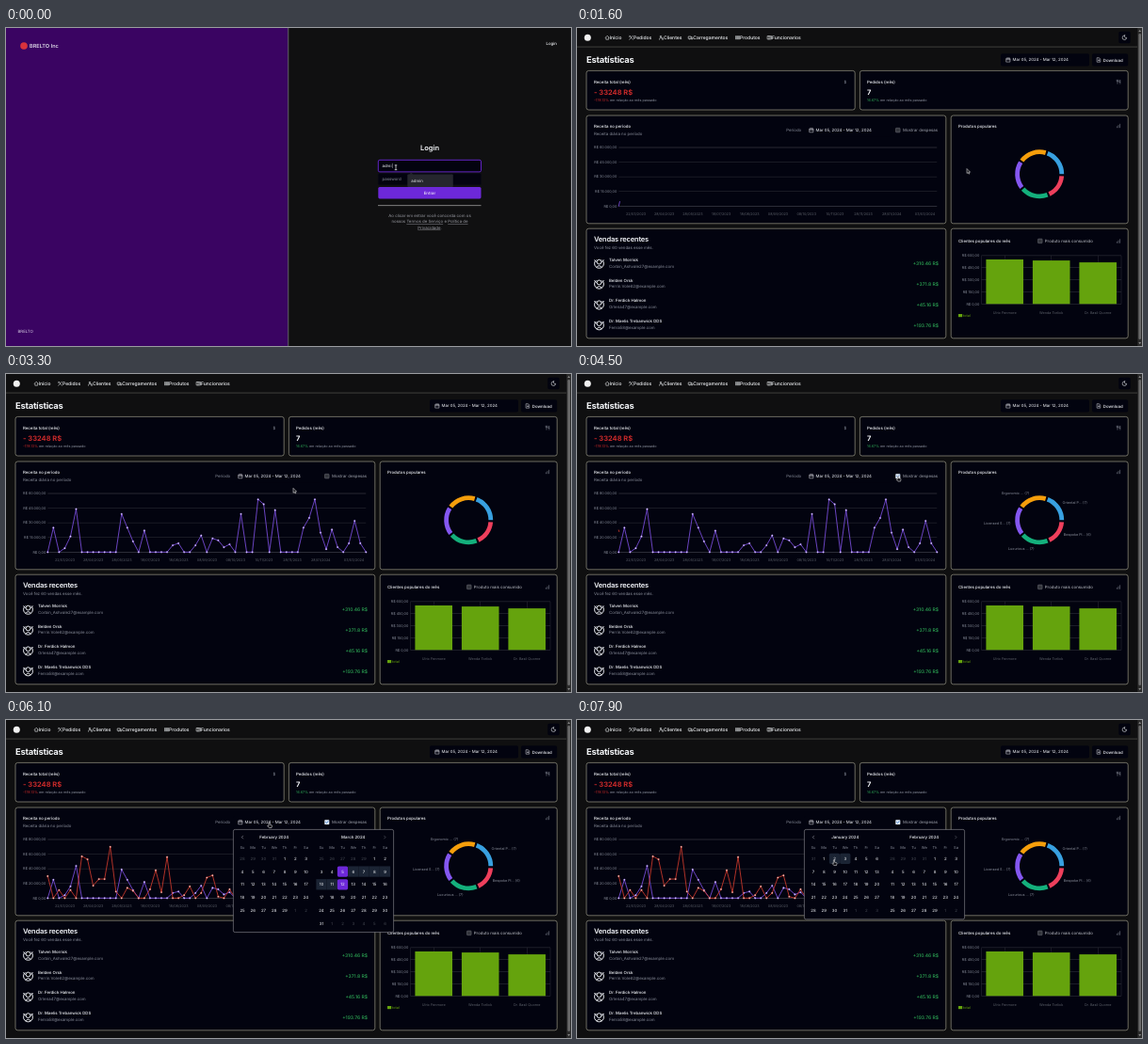
Animation, 600 px wide and 338 px high, one loop 8000 ms. Source, as an HTML page:

```html
<!DOCTYPE html>
<html lang="pt-BR">
<head>
<meta charset="utf-8">
<title>Painel</title>
<style>
  html, body { margin: 0; width: 100%; height: 100%; overflow: hidden; background: #0f0f10; }
  svg { display: block; width: 100vw; height: 100vh; font-family: Inter, "Open Sans", sans-serif; text-rendering: geometricPrecision; }
  text { white-space: pre; }
</style>
</head>
<body>
<svg id="stage" viewBox="0 0 600 338" preserveAspectRatio="none"></svg>
<script>
const LOOP = 8000;
const INK = '#f5f7fa', MUTED = '#8a8f9b', FAINT = '#5c6069', CARD = '#02030f', HOVER = '#1b2434',
      EDGE = '#a5a28e', VIOLET = '#7c50e0', RED = '#cf3a2c', GREEN = '#2faf58', LIME = '#65a30d';

// Event times in ms
const T = { typed: 100, picked: 500, password: 650, submit: 1150, dash: 1600, dots: 3200, pieLabels: 3600,
            expenses: 4500, popover: 6000, prevMonth: 7000 };

const text = (x, y, s, { size = 4.375, fill = INK, weight = 400, anchor = 'start', extra = '' } = {}) =>
  `<text x="${x}" y="${y}" font-size="${size}" fill="${fill}" font-weight="${weight}" text-anchor="${anchor}" ${extra}>${s}</text>`;
const rect = (x, y, w, h, fill, r = 0, extra = '') =>
  `<rect x="${x}" y="${y}" width="${w}" height="${h}" rx="${r}" fill="${fill}" ${extra}/>`;
const path = (d, stroke = INK, w = 0.6, extra = '') =>
  `<path d="${d}" fill="none" stroke="${stroke}" stroke-width="${w}" stroke-linecap="round" stroke-linejoin="round" ${extra}/>`;
const circle = (x, y, r, fill, extra = '') => `<circle cx="${x}" cy="${y}" r="${r}" fill="${fill}" ${extra}/>`;
const group = (id, body, extra = '') => `<g id="${id}" ${extra}>${body}</g>`;
const $ = id => document.getElementById(id);
const show = (id, on) => { $(id).style.display = on ? '' : 'none'; };
const clamp = v => Math.max(0, Math.min(1, v));
const easeOut = v => 1 - (1 - clamp(v)) ** 2.2;
const smooth = v => (v = clamp(v), v * v * (3 - 2 * v));

// ---------- login ----------
function login() {
  const link = s => `<tspan text-decoration="underline">${s}</tspan>`;
  const note = { fill: '#9a9ba3', anchor: 'middle' };
  return rect(0, 0, 600, 338, '#101011') + rect(0, 0, 299.5, 338, '#3a0462') + rect(299.4, 0, 0.8, 338, '#77757c')
    + circle(19, 19, 3.8, '#d8323c')
    + text(25, 20.8, 'BRELTO Inc', { size: 5.625, weight: 500 })
    + text(12.5, 323.8, 'BRELTO', { fill: '#d9cfe4' })
    + text(585, 17.8, 'Login', { weight: 500, anchor: 'end' })
    + text(450, 130.3, 'Login', { size: 7.5, weight: 600, anchor: 'middle' })
    + rect(395.3, 140.3, 109.2, 12.6, '#03030f', 1.6, 'id="userBox"')
    + text(399.5, 148.3, '', { extra: 'id="user"' })
    + rect(395.3, 154.5, 109.2, 12.3, '#03030f', 1.6, 'id="passBox"')
    + text(399.5, 162.3, 'password', { extra: 'id="pass"' })
    + rect(395.3, 169, 109.2, 12.4, '#6d28d9', 1.6, 'id="submit"')
    + text(450, 176.8, 'Entrar', { weight: 500, anchor: 'middle', extra: 'id="submitText"' })
    + rect(395, 188.3, 109.5, 0.8, '#9b9b9b')
    + text(450, 201, 'Ao clicar em entrar você concorda com os', note)
    + text(450, 207.4, `nossos ${link('Termos de Serviço')} e ${link('Política de')}`, note)
    + text(450, 213.6, `${link('Privacidade')}.`, note)
    + group('suggest', rect(426.3, 155.6, 48.5, 13.4, '#25262e', 1) + text(430.3, 163.7, 'admin', { fill: '#e4e6ea' })
      + '<path d="M428 155.7l2.3-2 2.3 2z" fill="#25262e"/>');
}

// ---------- dashboard pieces ----------
const card = (x, y, w, h) => rect(x, y, w, h, CARD, 2.4, `stroke="${EDGE}" stroke-width=".65"`);
const calendarIcon = (x, y) => path(`M${x - 1.9} ${y - 1.6}h3.8v3.8h-3.8zM${x - 1.9} ${y - .2}h3.8M${x - .9} ${y - 2.3}v1.2M${x + .9} ${y - 2.3}v1.2`, INK, .45);
const barsIcon = (x, y) => path(`M${x - 1.6} ${y + 1.8}v-1M${x} ${y + 1.8}v-2.3M${x + 1.6} ${y + 1.8}v-3.6`, MUTED, .55);
const dateButton = (x, y, id) => rect(x, y, 94, 13.2, CARD, 1.8, `id="${id}"`) + calendarIcon(x + 8, y + 6.6)
  + text(x + 12.6, y + 8.1, 'Mar 05, 2024 - Mar 12, 2024');
const box = (x, y) => rect(x - 2.3, y - 2.3, 4.6, 4.6, '#34363d', .6, 'stroke="#70737b" stroke-width=".5"');

function header() {
  const nav = [['Início', 34.7, 'M-2 0L0-2 2 0M-1.4 0v2h2.8V0'],
    ['Pedidos', 60, 'M-1.7-2L1.7 2M1.7-2L-1.7 2M-2-.8l1-1'],
    ['Clientes', 92, 'M-2 2q0-2 1.5-2t1.5 2M1 0q1 0 1 2M-1.2-1.2a.7.7 0 1 0 1.4 0a.7.7 0 1 0-1.4 0'],
    ['Carregamentos', 123.3, 'M-2.2-1.2h2.6v2.4h-2.6zM.4-.4h1.2l.7.8v.8H.4M-1.3 1.7h.2M1.2 1.7h.2'],
    ['Produtos', 173, 'M-2-1.6v3.2M-.9-1.6v3.2M0-1.6v3.2M1-1.6v3.2M2-1.6v3.2'],
    ['Funcionarios', 207, 'M-2-1.7h4v3.4h-4zM-.6-1.7v3.4M.4-.5h1M.4.6h1']];
  return rect(0, 0, 600, 338, '#0f0f10') + rect(0, 19.7, 595, .7, '#55554f')
    + circle(11.3, 10.2, 3.5, '#f2f2f2')
    + nav.map(([s, x, d]) => path(d, INK, .55, `transform="translate(${x - 2.5} 10.2)"`) + text(x, 12, s, { size: 5, weight: 500 })).join('')
    + rect(575.3, 3.8, 12.4, 12.4, CARD, 1.8) + path('M581.6 7.9a1.7 1.7 0 0 0 2.1 2.4a2.3 2.3 0 1 1-2.1-2.4z', INK, .55)
    + rect(595.3, 0, 4.7, 338, '#2b2b2b') + rect(596.4, 6, 2.6, 325, '#6b6b6b', 1.3)
    + '<path d="M596.3 4l1.4-1.9 1.4 1.9zM596.3 334l1.4 1.9 1.4-1.9z" fill="#8c8c8c"/>'
    + text(10, 37, 'Estatísticas', { size: 9.375, weight: 700, extra: 'letter-spacing="-.23"' })
    + dateButton(450, 27.3, 'topDate') + rect(547, 27.3, 38.2, 13.2, CARD, 1.8)
    + path('M552.5 31.7h2l1.2 1.2v3.3h-3.2zM554.1 33v1.8M553.3 34.2l.8.8.8-.8', INK, .45)
    + text(558.8, 35.5, 'Download', { weight: 500 });
}

function summary() {
  const line = (x, part, color) => text(x, 78.4, `<tspan fill="${color}">${part}</tspan> em relação ao mês passado`, { size: 3.75, fill: MUTED });
  return card(10, 45.4, 285.2, 41.6) + card(300.4, 45.4, 284.8, 41.6)
    + text(18, 58.7, 'Receita total (mês)', { weight: 500 }) + text(285, 58.7, '$', { fill: MUTED, anchor: 'middle' })
    + text(18, 71.2, '- 33248 R$', { size: 7.5, weight: 700, fill: '#cb2a2a' }) + line(18, '-178.13%', '#cb2a2a')
    + text(308, 58.7, 'Pedidos (mês)', { weight: 500 }) + text(308, 71.2, '7', { size: 7.5, weight: 700 })
    + line(308, '16.67%', GREEN)
    + path('M573.2 55.2v1.5h1.6v-1.5M574 55.2v4M576.8 59.2v-4q-1 1-1 2.3h1', MUTED, .5);
}

// Heights of the two series on a 60-unit and an 80-unit axis
const income = { 1: 25, 3: 4, 4: 16, 5: 44, 13: 39, 14: 25, 15: 11, 17: 22, 22: 7, 23: 9, 26: 7, 27: 17, 29: 14, 30: 12, 31: 5, 32: 8,
  34: 39, 37: 54, 38: 49, 40: 43, 45: 25, 46: 35, 47: 54, 48: 20, 49: 3, 50: 23, 51: 5, 53: 9, 54: 32, 55: 9 };
const costs = { 0: 30, 2: 11, 4: 11, 6: 57, 7: 53, 8: 17, 9: 26, 10: 26, 11: 70, 12: 9, 14: 14, 15: 10, 18: 12, 19: 38, 20: 8, 21: 56,
  24: 4, 25: 16, 27: 7, 28: 28, 29: 31, 30: 2, 32: 12, 35: 14, 36: 5, 38: 18, 39: 6, 42: 32, 43: 8, 45: 4, 49: 6, 51: 9, 54: 4, 55: 13 };
const COUNT = 57, BASE = 189.3, SPAN = 62.3;
const points = (series, top) => Array.from({ length: COUNT }, (_, i) => [44.3 + i * 6.036, BASE - (series[i] || 0) * SPAN / top]);
const toPath = pts => 'M' + pts.map(p => p.map(v => v.toFixed(2)).join(' ')).join('L');

const series = (id, color) => group(id, path('', color, .85, `id="${id}Line" pathLength="1"`)
  + group(id + 'Dots', Array.from({ length: COUNT }, () => circle(0, 0, .85, '#fff', `stroke="${color}" stroke-width=".45"`)).join('')));

function revenue() {
  const dates = ['22/03/2023', '28/04/2023', '28/05/2023', '18/07/2023', '18/08/2023', '08/09/2023', '08/10/2023', '10/11/2023', '28/11/2023', '28/01/2024', '03/03/2024'];
  let s = card(10, 93, 381.8, 114.8) + text(18, 105.8, 'Receita no período', { weight: 500 })
    + text(18, 113.8, 'Receita diária no período', { fill: MUTED })
    + text(222.3, 110.1, 'Período', { fill: MUTED }) + dateButton(241, 102, 'chartDate')
    + box(340.8, 108.6) + group('check', rect(338.4, 106.2, 4.8, 4.8, '#dce8f5', .6) + path('M339.6 108.6l.9 1 1.6-2', '#1c62c4', .7))
    + text(346, 110.1, 'Mostrar despesas', { fill: '#a0a4ad' });
  for (let i = 0; i < 5; i++) {
    const y = BASE - SPAN * i / 4;
    s += rect(44.3, y - .25, 338, .5, i === 4 ? '#4c4d55' : i ? '#303139' : '#55565e')
      + text(42.3, y + 1.2, '', { size: 3.75, fill: MUTED, anchor: 'end', extra: `id="axis${i}"` });
  }
  dates.forEach((d, i) => { s += text(62.5 + i * 30.2 + (i > 9 ? 5 : 0), 199.3, d, { size: 3.75, fill: FAINT, anchor: 'middle' }); });
  return s + series('income', VIOLET) + series('costs', RED);
}

function products() {
  const parts = [['#38a0e0', 7], ['#f59e0b', 7], ['#8457f0', 7], ['#14b07c', 7], ['#ee3f5c', 6]];
  const at = (r, deg) => { const a = deg * Math.PI / 180; return `${491.2 + r * Math.cos(a)} ${155.3 - r * Math.sin(a)}`; };
  let from = 0, ring = '';
  for (const [color, n] of parts) {
    const to = from + 335 * n / 34;
    ring += `<path d="M${at(26, from)}A26 26 0 0 0 ${at(26, to)}L${at(21.2, to)}A21.2 21.2 0 0 1 ${at(21.2, from)}z" fill="${color}"/>`;
    from = to + 5;
  }
  const labels = [['Ergonomic ... (7)', 451, 128.3], ['Oriental P... (7)', 515.6, 137.7], ['Licensed S... (7)', 432, 159.7],
    ['Luxurious ... (7)', 458, 186.7], ['Bespoke Pl... (6)', 516.8, 172.3]];
  return card(397.2, 93, 188, 114.8) + text(405, 105.8, 'Produtos populares', { weight: 500 }) + barsIcon(575, 104) + ring
    + group('pieLabels', labels.map(([s, x, y]) => text(x, y, s, { size: 3.75, fill: MUTED })).join(''));
}

function sales() {
  const rows = [['Talven Morrisk', 'Corbin_Ashvale27@example.com', '310.46'], ['Belden Orsk', 'Perrin.Vole62@example.com', '371.8'],
    ['Dr. Ferdick Halmon', 'Orlena47@example.com', '45.16'], ['Dr. Maelis Trebanwick DDS', 'Fenra58@example.com', '193.76']];
  return card(10, 213.2, 381.8, 116.6)
    + text(18, 227.4, 'Vendas recentes', { size: 7.5, weight: 600, extra: 'letter-spacing="-.19"' })
    + text(18, 235.4, 'Você fez 60 vendas esse mês.', { fill: MUTED })
    + rows.map(([name, mail, sum], i) => {
      const y = 250.3 + i * 21.85;
      return path(`M20 ${y - 3.6}a5 5 0 1 0 7 0M21 ${y + 3.9}q2.5-3.4 5 0M18.6 ${y - 3.4}l2 1.6M28.4 ${y - 3.4}l-2 1.6`, INK, .95)
        + circle(23.5, y - 1.7, 2.4, 'none', `stroke="${INK}" stroke-width=".95"`)
        + text(34, y - 2.6, name, { weight: 500 }) + text(34, y + 4.2, mail, { fill: MUTED })
        + text(384, y + 1.7, `+${sum} R$`, { size: 5, weight: 500, fill: GREEN, anchor: 'end' });
    }).join('');
}

function customers() {
  const bars = [['Ulric Fenmore', 47.3], ['Wenda Torlick', 46.2], ['Dr. Basil Quorne', 44.2]];
  let s = card(397.2, 213.2, 188, 116.6) + text(405, 228, 'Clientes populares do mês', { weight: 500 })
    + box(491.8, 226.4) + text(496.8, 228, 'Produto mais consumido', { fill: '#c5c8ce' }) + barsIcon(575, 226.5);
  for (let i = 0; i < 5; i++) {
    const y = 293.3 - i * 12.85;
    s += rect(429.5, y - .2, 148.5, .4, '#454650') + text(427.3, y + 1.3, `R$ ${i * 150},00`, { size: 3.75, fill: MUTED, anchor: 'end' });
  }
  for (const x of [429.5, 454.2, 503.7, 553.2, 578]) s += rect(x - .2, 241.9, .4, 51.4, '#3a3b44');
  bars.forEach(([name, h], i) => {
    const x = 434.4 + i * 49.5;
    s += rect(x, 293.3 - h, 39.6, h, LIME) + text(x + 19.8, 303.6, name, { size: 3.75, fill: FAINT, anchor: 'middle' });
  });
  return s + rect(405, 304, 4.2, 3.2, LIME) + text(410, 307.2, 'total', { size: 3.75, fill: LIME });
}

// ---------- calendar ----------
const STEP = 11.25, ROW = 13.75;

function month(index, left) {
  const first = new Date(2024, index, 1), lead = first.getDay();
  const days = new Date(2024, index + 1, 0).getDate(), total = Math.ceil((lead + days) / 7) * 7;
  let s = text(left + STEP * 3, 126.2, first.toLocaleString('en-US', { month: 'long' }) + ' 2024', { weight: 500, anchor: 'middle' });
  ['Su', 'Mo', 'Tu', 'We', 'Th', 'Fr', 'Sa'].forEach((d, i) => { s += text(left + i * STEP, 137.3, d, { size: 4, fill: MUTED, anchor: 'middle' }); });
  for (let i = 0; i < total; i++) {
    const day = new Date(2024, index, 1 - lead + i), inside = day.getMonth() === index, n = day.getDate();
    const x = left + (i % 7) * STEP, y = 147.3 + Math.floor(i / 7) * ROW;
    const end = n === 5 || n === 12;
    if (index === 2 && inside && n >= 5 && n <= 12)
      s += rect(x - 5.63, y - 5.63, STEP, STEP, end ? '#6d28d9' : HOVER, end ? 1.6 : 0);
    s += text(x, y + 1.6, n, { fill: inside ? INK : '#454952', anchor: 'middle' });
  }
  return s;
}

function popover() {
  const frame = h => rect(241.4, 116.4, 170.2, h, CARD, 1.8, 'stroke="#85868b" stroke-width=".65"');
  const hoverCell = (id, col) => rect(251 + col * STEP - 5.63, 141.7, STEP, STEP, HOVER, 1.6, `id="${id}"`);
  return group('late', frame(109.2) + month(1, 251) + month(2, 335))
    + group('early', frame(95.4) + hoverCell('day2', 2) + hoverCell('day3', 3) + month(0, 251) + month(1, 335))
    + rect(246.6, 120.2, 8.8, 8.8, HOVER, 1.5, 'id="prevHover"')
    + path('M251.6 123.2l-1.3 1.4 1.3 1.4', '#b5b8c0', .55) + path('M401.7 123.2l1.3 1.4-1.3 1.4', '#6e727b', .55);
}

const cursors = group('arrow', '<path d="M0 0v5l1.2-1 .8 1.7.8-.4-.8-1.6h1.6z" fill="#15151a" stroke="#f4f4f4" stroke-width=".5"/>')
  + group('hand', '<path d="M-.6 0q.6-.7 1.1 0v2.2l2 .4q.7.3.5 1.1l-.5 1.9h-2.7l-1.7-2q.3-.8 1.3 0z" fill="#15151a" stroke="#f4f4f4" stroke-width=".5"/>')
  + group('beam', path('M-.9-2.4h1.8M0-2.4v4.8M-.9 2.4h1.8', '#fff', .65))
  + group('denied', circle(0, 0, 2.3, '#3a1418', 'stroke="#e8a9a9" stroke-width="1.5"')
    + circle(0, 0, 2.3, 'none', 'stroke="#d8343c" stroke-width="1"') + path('M-1.6-1.6l3.2 3.2', '#d8343c', .9));

$('stage').innerHTML = group('login', login())
  + group('dash', header() + summary() + revenue() + products() + sales() + customers() + group('popover', popover()))
  + group('cursor', cursors);

// ---------- motion ----------
const route = [[0, 414, 148.3], [1599, 414, 148.3], [1600, 414, 149.5], [2500, 414, 149.5], [3200, 305, 121.3], [3500, 305, 121.3],
  [4200, 341, 108.5], [4650, 341, 108.5], [5300, 279.5, 109], [6150, 279.5, 109], [6600, 252, 126.5], [7150, 252, 126.5],
  [7700, 286, 148], [7880, 273, 149], [8000, 273, 149]];

function pointer(t) {
  const i = route.findIndex(p => p[0] > t), [t0, x0, y0] = route[i - 1], [t1, x1, y1] = route[i];
  const k = smooth((t - t0) / (t1 - t0));
  return [x0 + (x1 - x0) * k, y0 + (y1 - y0) * k];
}

function drawSeries(id, data, top, progress, dots) {
  const pts = points(data, top);
  $(id + 'Line').setAttribute('d', toPath(pts));
  $(id + 'Line').setAttribute('stroke-dasharray', progress >= 1 ? 'none' : `${progress} 2`);
  show(id + 'Dots', dots);
  if (dots) [...$(id + 'Dots').children].forEach((c, i) => { c.setAttribute('cx', pts[i][0]); c.setAttribute('cy', pts[i][1]); });
}

function renderLogin(t) {
  const busy = t >= T.submit, onPass = t >= T.picked && !busy, onUser = t < T.picked;
  const letters = Math.max(0, Math.min(5, Math.floor((t - T.password) / 80) + 1));
  const ring = on => on ? '#6d28d9' : '#0b0c17';
  $('user').textContent = (t < T.typed ? 'admi' : 'admin') + (onUser ? '|' : '');
  $('user').setAttribute('fill', busy ? '#777b84' : INK);
  $('pass').textContent = letters ? '•'.repeat(letters) : 'password';
  $('pass').setAttribute('fill', letters ? (busy ? '#b4b6bc' : INK) : MUTED);
  for (const [id, on] of [['userBox', onUser], ['passBox', onPass]]) {
    $(id).setAttribute('stroke', ring(on));
    $(id).setAttribute('stroke-width', on ? .9 : .5);
  }
  $('submit').setAttribute('fill', busy ? '#431a80' : '#6d28d9');
  $('submitText').setAttribute('fill', busy ? '#a08fb8' : '#efe8fb');
  show('suggest', onUser);
}

function renderDash(t, x, y) {
  const costsOn = t >= T.expenses, open = t >= T.popover, early = t >= T.prevMonth;
  const top = 60 + 20 * easeOut((t - T.expenses) / 700);
  for (let i = 0; i < 5; i++) $('axis' + i).textContent = `R$ ${i ? i * (costsOn ? 20 : 15) + '.000' : 0},00`;
  drawSeries('income', income, top, easeOut((t - T.dash) / 450), t >= T.dots);
  show('costs', costsOn);
  if (costsOn) drawSeries('costs', costs, 80, easeOut((t - T.expenses) / 1050), t >= T.expenses + 1500);
  show('check', costsOn);
  show('pieLabels', t >= T.pieLabels);
  show('popover', open);
  show('late', !early);
  show('early', early);
  show('prevHover', x < 256 && y > 119);
  show('day2', x < 279 && y > 142);
  show('day3', x > 271 && y > 142);
  const overDate = !open && t > 4700 && x < 335;
  $('chartDate').setAttribute('fill', overDate ? HOVER : CARD);
}

function render(t) {
  const onDash = t >= T.dash, [x, y] = pointer(t);
  show('login', !onDash);
  show('dash', onDash);
  if (onDash) renderDash(t, x, y); else renderLogin(t);
  const onButton = t > 4000 && !(t > 7150 && y < 142);
  const kind = !onDash ? (t < T.submit ? 'beam' : 'denied') : onButton ? 'hand' : 'arrow';
  for (const id of ['arrow', 'hand', 'beam', 'denied']) show(id, id === kind);
  $('cursor').setAttribute('transform', `translate(${x} ${y})`);
}

const start = performance.now();
function tick() {
  render((performance.now() - start) % LOOP);
  requestAnimationFrame(tick);
}
tick();
</script>
</body>
</html>
```
